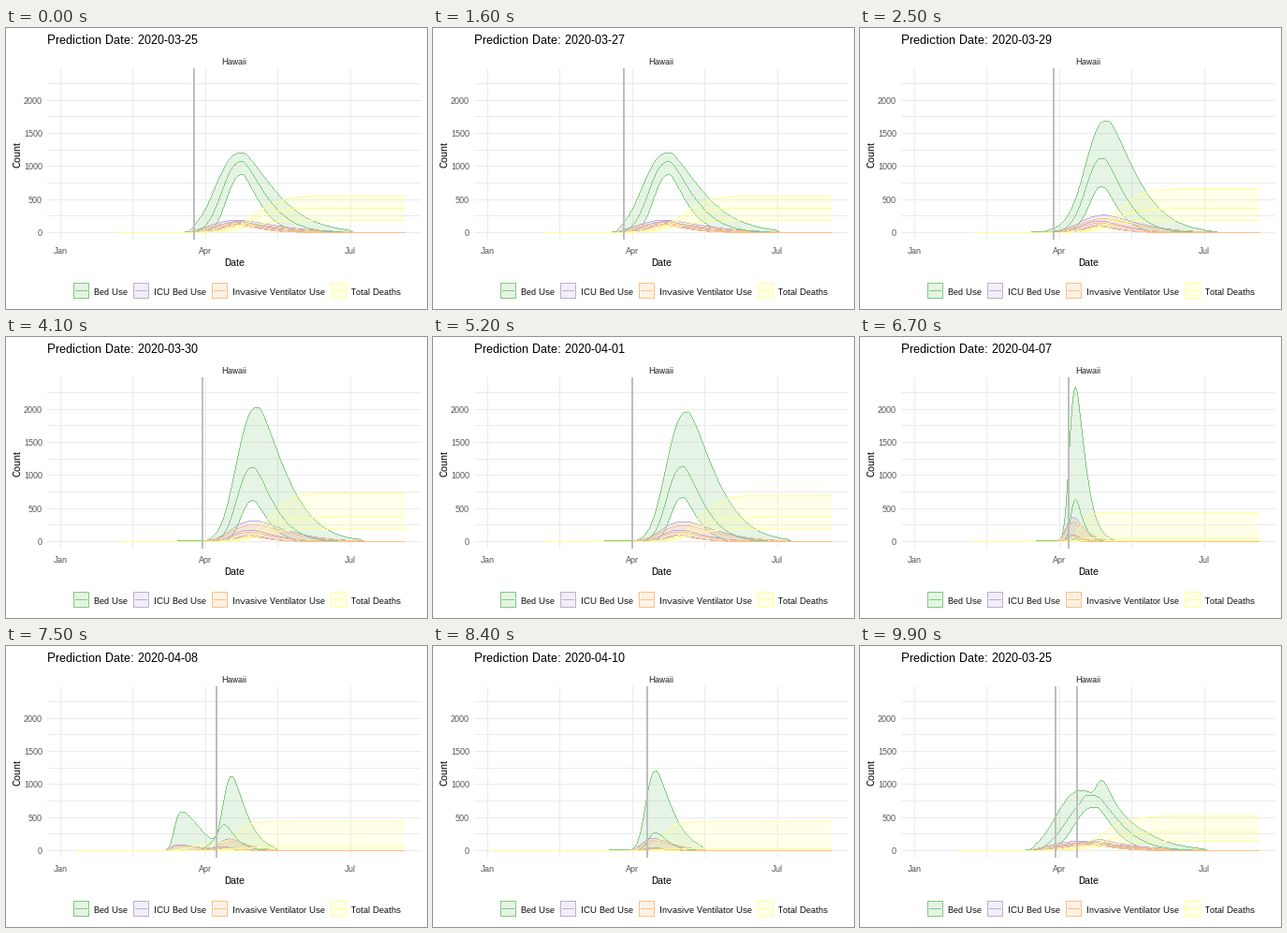
Write a matplotlib script that moves like this. It is 450 by 300 pixels and loops after 10 s.

```python
import matplotlib.pyplot as plt
import numpy as np
from matplotlib.animation import FuncAnimation
from matplotlib.patches import Rectangle

plt.rcParams.update({
    "font.family": "Liberation Sans",
    "text.hinting": "native",
    "text.hinting_factor": 1,
    "path.simplify": False,
})

W, H, DPI = 450, 300, 72
LAST_DAY = 216          # days are counted from 1 January 2020
STEPS = 4               # frames per transition
UP, MID, LOW = TIERS = range(3)

# series: (colour, share of bed use)
SERIES = {
    "Bed Use": ("#7FC97F", 1),
    "ICU Bed Use": ("#BEAED4", 0.155),
    "Invasive Ventilator Use": ("#FDC086", 0.125),
    "Total Deaths": ("#FFFF99", None),
}

# a forecast: heights per tier, peak day, lead of the lower tiers, slopes
wide = dict(peaks=(1207, 1073, 874), day=114.4, lead=0, rise=21.5, fall=27.5,
            first=36, onset=79, end=184, deaths=(555, 370, 180))
tall = dict(peaks=(1960, 1130, 665), day=125.9, lead=2.8, rise=17.4, fall=23,
            first=36, onset=74, end=191, deaths=(700, 364, 189))
spike = dict(peaks=(2340, 640, 40), day=101.4, lead=0, rise=5.4, fall=8,
             first=36, onset=77, end=128, deaths=(437, 60, 8))
short = dict(peaks=(1203, 268, 45), day=106, lead=0, rise=8.5, fall=13.5,
             first=2, onset=77, end=137, deaths=(437, 30, 3))

# day of prediction, forecast
STATES = [
    (84, wide), (85, wide), (86, wide),
    (88, dict(tall, peaks=(1900, 1175, 670), day=122.2)),
    (89, dict(tall, peaks=(2055, 1120, 605), day=123.9,
              deaths=(750, 367, 189))),
    (90, dict(tall, day=124.9)),
    (91, tall),
    (95, spike), (97, spike),
    (98, dict(short, peaks=(1450, 350, 45), day=104.5)),
    (100, short),
    (102, dict(short, peaks=(1300, 230, 40), day=102.5)),
]
STARTS = [5 + 8 * k + min(k, 4) for k in range(len(STATES))]


def px(day):
    return 58.2 + 1.7033 * day


def py(value):
    return 218 - 0.0707 * value


def value(m, name, tier, day):
    share = SERIES[name][1]
    if share is None:
        spread = 0.3 * m["fall"]
        u = day - m["day"] - spread + 2 * tier
        return m["deaths"][tier] / (1 + np.exp(-u / spread))
    # the smaller series peak earlier and last longer
    minor = share < 1
    rise = m["rise"] * 0.77 ** tier * (1.1 if minor else 1)
    fall = m["fall"] * 0.72 ** tier * (1.2 if minor else 1)
    u = day - m["day"] + 1.5 * minor + m["lead"] * (tier > UP)
    y = m["peaks"][tier] * share * np.where(
        u < 0, np.exp(-np.abs(u / rise) ** 2.5),
        np.exp(-np.abs(u / fall) ** 1.4))
    y = y * np.clip((day - m["onset"]) / 6, 0, 1)
    if tier == UP:
        started = (day >= m["onset"]) & (u < 0)
        y = np.where(started, np.maximum(y, 14 * share), y)
    return y * np.clip((m["end"] - day) / 3, 0, 1)


def stretched(m, tier, day, first):
    """Spread the days of a shorter series over a longer one."""
    extra = m["first"] - first
    if extra == 0:
        return day
    g0 = m["day"] + (-2 if tier == UP else -22)
    g1 = m["day"] + (30 if tier == UP else 1)
    return np.interp(day, [first, g0 - extra, g1, LAST_DAY],
                     [m["first"], g0, g1, LAST_DAY])


def curve(a, b, f, name, tier):
    first = min(a["first"], b["first"])
    day = np.arange(first, LAST_DAY + 1.0)
    da = stretched(a, tier, day, first)
    db = stretched(b, tier, day, first)
    x = (1 - f) * da + f * db
    y = (1 - f) * value(a, name, tier, da) + f * value(b, name, tier, db)
    return px(x), py(y)


def hairline(x, y):
    """One-pixel line as upright bars, one for each pixel column."""
    cols = np.arange(np.floor(x[0]), np.floor(x[-1]) + 1) + 0.5
    rows = np.interp(cols, x, y)
    mid = (rows[1:] + rows[:-1]) / 2
    ends = np.stack([rows, np.r_[rows[0], mid], np.r_[mid, rows[-1]]])
    top = np.round(ends.min(axis=0))
    bottom = np.maximum(np.round(ends.max(axis=0)), top + 1)
    gap = np.full_like(cols, np.nan)
    return (np.stack([cols, cols, gap], 1).ravel(),
            np.stack([top, bottom, gap], 1).ravel())


def date_text(day):
    month, dom = (3, day - 59) if day < 91 else (4, day - 90)
    return f"Prediction Date: 2020-{month:02d}-{dom:02d}"


fig = plt.figure(figsize=(W / DPI, H / DPI), dpi=DPI, facecolor="white")
ax = fig.add_axes([0, 0, 1, 1])
ax.set(xlim=(0, W), ylim=(H, 0))
ax.axis("off")


def line(x, y, color, z):
    return ax.plot(x, y, color=color, lw=1, antialiased=False, snap=False,
                   solid_capstyle="butt", zorder=z)[0]


def label(x, y, s, size=9, color="black", ha="left", **kw):
    return ax.text(x, y, s, fontsize=size, color=color, ha=ha,
                   va="baseline", zorder=20, **kw)


def box(x, y, w, h, z, **kw):
    return ax.add_patch(Rectangle((x, y), w, h, antialiased=False,
                                  snap=False, zorder=z, **kw))


# grid and axes
for v in range(0, 2251, 250):
    row = np.round(py(v)) + 0.5
    line([44, 444], [row, row], "#EBEBEB", 1)
    if v % 500 == 0:
        label(39, row + 3.5, str(v), color="#4D4D4D", ha="right")
for k, month in enumerate(("Jan", "", "Apr", "", "Jul")):
    col = np.floor(px(45.5 * k))
    line([col + 0.5, col + 0.5], [43, 226], "#EBEBEB", 1)
    label(col, 241, month, color="#4D4D4D", ha="center")

title = label(44, 17, "", size=13)
label(244, 39, "Hawaii", color="#1A1A1A", ha="center")
label(244, 254, "Date", size=11, ha="center")
label(16, 135, "Count", size=11, ha="center", rotation=90,
      rotation_mode="anchor")

# legend
for (name, (color, _)), x in zip(SERIES.items(), (72, 136, 220, 347)):
    box(x + 0.5, 272.5, 16, 16, 2, fc=color, alpha=0.2, lw=0)
    line([x + 0.5, x + 16.5, x + 16.5, x + 0.5, x + 0.5],
         [272.5, 272.5, 288.5, 288.5, 272], color, 3)
    line([x + 2, x + 15], [280.5, 280.5], color, 3)
    label(x + 22, 285, name)

# ribbons and the lines of the three tiers
art = {}
for i, (name, (color, _)) in enumerate(SERIES.items()):
    fill = ax.fill([0, 1, 1], [0, 0, 1], fc=color, alpha=0.2, lw=0,
                   snap=False, zorder=4 + i)[0]
    lines = [line([], [], color, 9 + 0.1 * i if t == MID else 4.5 + i)
             for t in TIERS]
    art[name] = fill, lines

marker, leaving = (box(0, 43, 2, 183, 12, fc="#BEBEBE", lw=0)
                   for _ in range(2))


def progress(frame):
    """Previous state, next state and how far the change has come."""
    k = sum(s <= frame for s in STARTS)
    if k == 0:
        return 0, 0, 1.0
    return k - 1, k % len(STATES), min((frame - STARTS[k - 1] + 1) / STEPS, 1)


def draw(frame):
    i, j, f = progress(frame)
    (day_a, a), (day_b, b) = STATES[i], STATES[j]
    title.set_text(date_text(day_b if f > 0.5 else day_a))
    marker.set_x(np.floor(px((1 - f) * day_a + f * day_b) - 0.5))
    # surplus marker rows stay until the loop closes
    leaving.set_x(np.floor(px(day_a) - 0.5))
    leaving.set_visible(j < i and f < 1)
    for name, (fill, lines) in art.items():
        curves = [curve(a, b, f, name, t) for t in TIERS]
        (ux, uy), _, (lx, ly) = curves
        fill.set_xy(np.column_stack([np.r_[ux, lx[::-1]],
                                     np.r_[uy, ly[::-1]] + 0.5]))
        for ln, c in zip(lines, curves):
            ln.set_data(*hairline(*c))
    return []


anim = FuncAnimation(fig, draw, frames=100, interval=100,
                     init_func=lambda: draw(0), repeat=True, repeat_delay=0)
plt.show()
```
